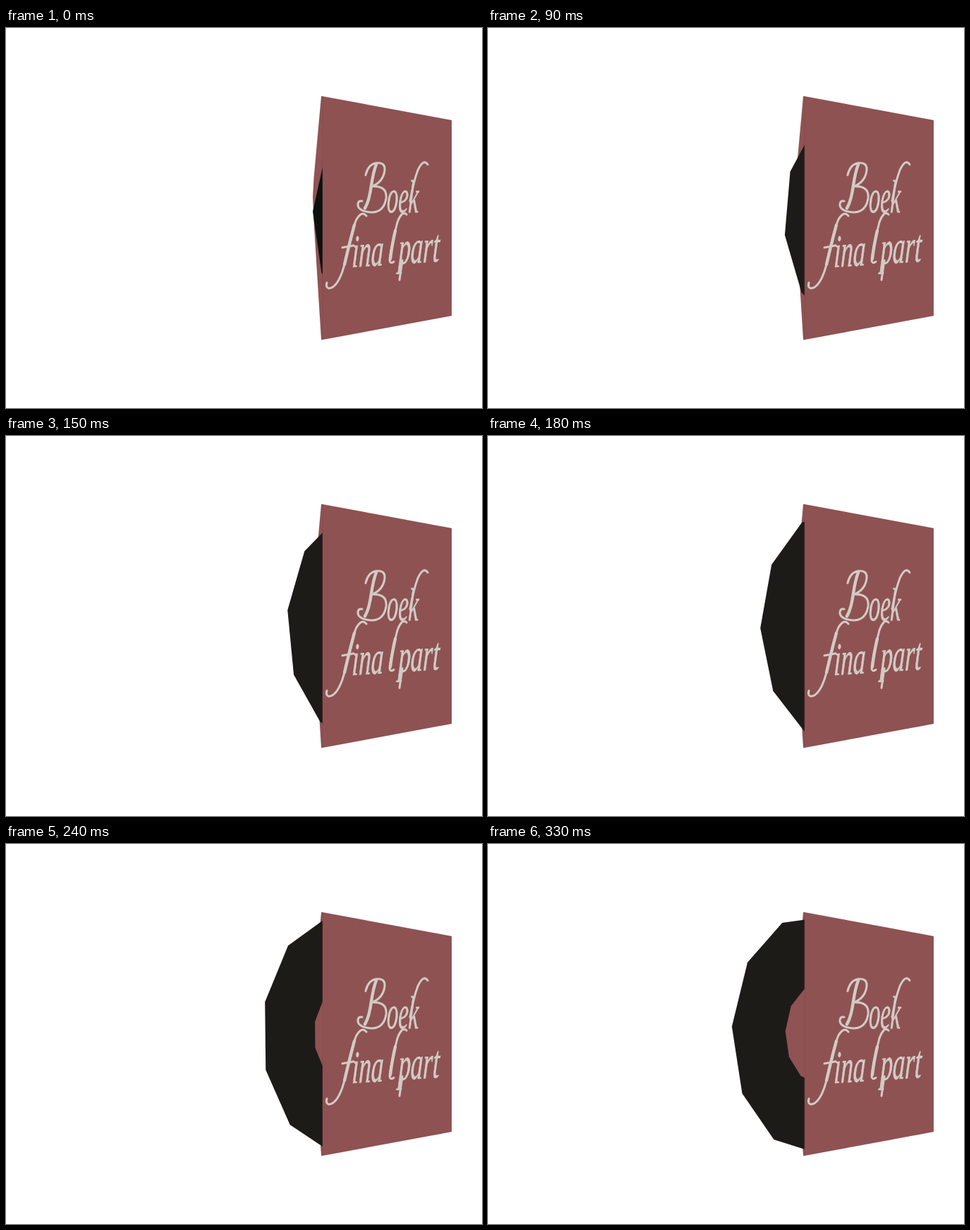
Recreate the animation shown at these times as an HTML page. Size 675x540 px, loop 0.36 s.

```html
<!DOCTYPE html>
<html lang="nl">
<head>
<meta charset="utf-8">
<title>Boek final part</title>
<style>
  html, body { margin: 0; width: 100%; height: 100%; overflow: hidden; background: #fff; }
  svg { display: block; width: 675px; height: 540px; }
  text { font: italic 66px "Liberation Serif", "Times New Roman", serif; fill: #d2cbc4; stroke: #d2cbc4; stroke-width: .8; }
  .swash { fill: none; stroke: #d2cbc4; stroke-width: 3; stroke-linecap: round; }
  .stem { stroke-width: 4.4; }
</style>
</head>
<body>
<svg viewBox="0 0 675 540" role="img" aria-label="Boek final part">
  <path fill="#8f5354" d="M447 97L436.500 213L435 240L436.500 275L447 443H449V97Z"/>
  <polygon id="disc"/>
  <polygon id="label" fill="#8f5354"/>
  <path fill="#8e5253" d="M449 97L632 131V409L449 443Z"/>
  <path stroke="#7c4748" stroke-opacity=".5" d="M449 98V442"/>
  <text transform="matrix(.49 0 -.04 1 539.5 261.500)">oek</text>
  <text transform="matrix(.53 -.036 -.04 1 490 340)">ina<tspan dx="40">part</tspan></text>
  <g class="swash">
    <!-- B -->
    <path d="M510 209Q513 195 524 192Q538 190 537 202Q535 219 519 225Q541 224 539 242Q536 262 518 262Q498 260 499 250Q500 245 505 246"/>
    <path class="stem" d="M525 194Q521 204 518 224Q515 246 509 256"/>
    <!-- f -->
    <path d="M511 267Q505 259 497 272C488 292 484 326 477 346Q469 369 458 370Q453 369 455 362M477 312L493 309"/>
    <path class="stem" d="M494 280Q487 306 480 336"/>
    <!-- k, l and p strokes -->
    <path d="M598 194Q592 185 584 202Q578 218 573 246"/>
    <path d="M568 265Q562 258 555 276C549 300 545 318 544 330Q545 336 550 332"/>
    <path class="stem" d="M552 288Q547 310 545 328"/>
    <path d="M562 330L558 358"/>
  </g>
</svg>
<script>
const STEP = 30, STEPS = 12, SIDES = 12;
const disc = document.getElementById('disc');
const label = document.getElementById('label');
const mix = (a, b, k) => a + (b - a) * k;

// Perspective of the sleeve plane: u from its left edge, v from its middle
function project(u, v) {
  const depth = 1 + 0.2455 * u;
  return [448 + 229.2 * u / depth, 270 + 345 * v / depth];
}

function ring(cx, radius, degrees) {
  return Array.from({ length: SIDES }, (_, i) => {
    const a = (degrees + i * 360 / SIDES) * Math.PI / 180;
    return project(cx - radius * Math.cos(a), -radius * Math.sin(a)).map(n => n.toFixed(2));
  }).join(' ');
}

function draw(now) {
  const step = Math.floor(now / STEP) % STEPS;
  const p = step / (STEPS - 1);
  const ease = p * p * (3 - 2 * p);
  const cx = mix(0.440, 0.094, ease);
  const turn = mix(63, 3.2, ease);
  disc.setAttribute('points', ring(cx, 0.4965, turn));
  disc.setAttribute('fill', step ? '#1d1b17' : '#0c110e');
  label.setAttribute('points', ring(cx, 0.206, turn));
}

const start = performance.now();
function tick() {
  draw(performance.now() - start);
  requestAnimationFrame(tick);
}
tick();
</script>
</body>
</html>
```
